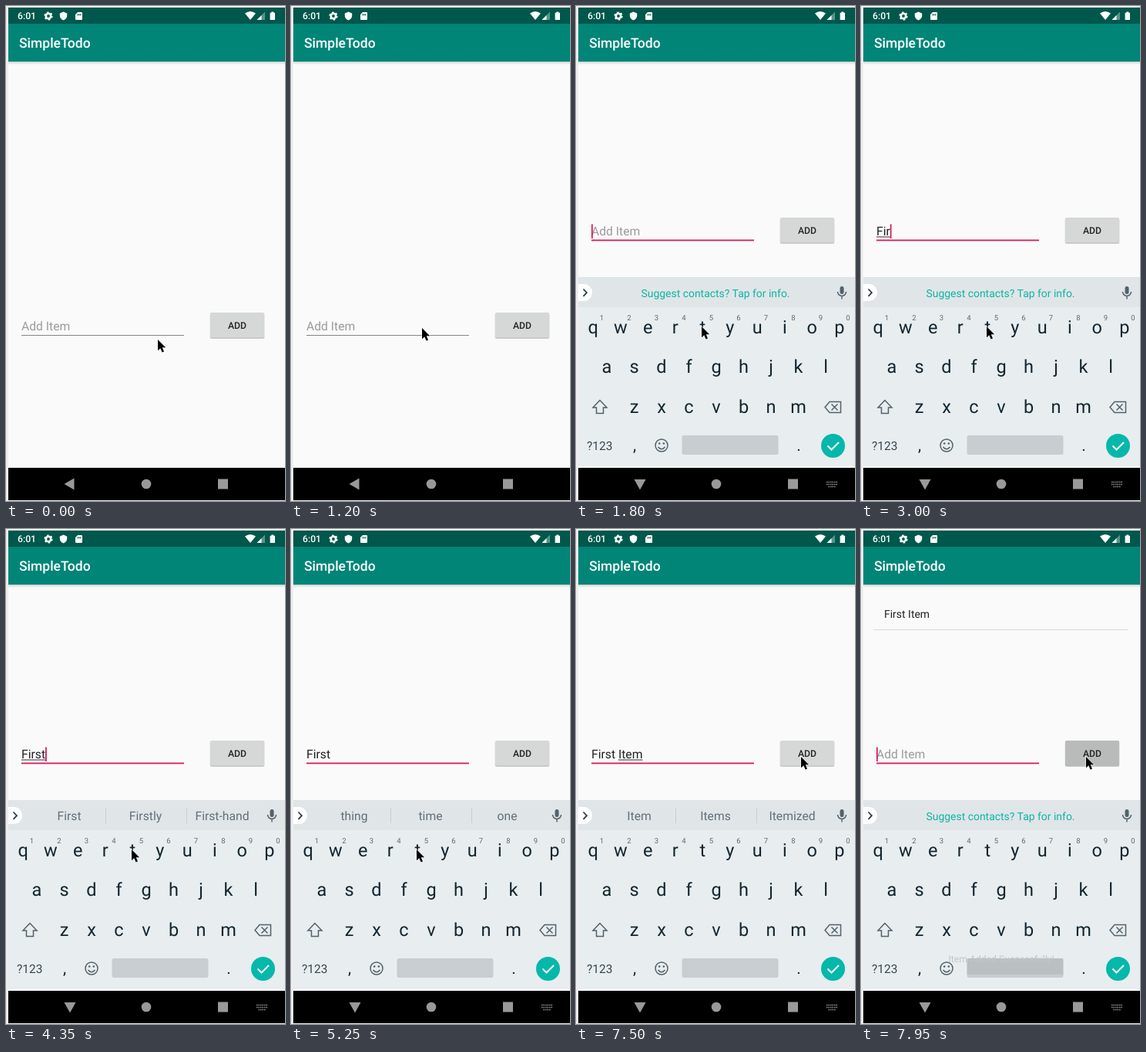
An HTML page that plays this animation: 362 by 641 pixels, repeating every 8000 ms.

```html
<!DOCTYPE html>
<html lang="en">
<head>
<meta charset="utf-8">
<title>To-do app</title>
<style>
  html, body { margin: 0; width: 100%; height: 100%; overflow: hidden; background: #eee; }
  svg { display: block; width: 100vw; height: 100vh; }
  text { font-family: Roboto, sans-serif; white-space: pre; text-rendering: geometricPrecision; }
  .medium { font-weight: 500; }
  .mid { text-anchor: middle; }
  .line { fill: none; stroke: #52626a; stroke-width: 1.5; }
</style>
</head>
<body>
<svg viewBox="0 0 362 641" xmlns="http://www.w3.org/2000/svg">
  <defs>
    <linearGradient id="shade" x2="0" y2="1">
      <stop stop-color="#cfd3d2"/><stop offset="1" stop-color="#fafafa"/>
    </linearGradient>
  </defs>
  <rect width="362" height="641" fill="#eee"/>
  <rect x="3" y="72" width="359" height="526" fill="#fafafa"/>
  <rect x="3" y="72" width="359" height="4" fill="url(#shade)"/>
  <rect x="3" y="2" width="359" height="21" fill="#00574b"/>
  <rect x="3" y="23" width="359" height="49" fill="#008577"/>
  <text class="medium" x="17" y="54" font-size="17.5" fill="#fff">SimpleTodo</text>

  <g fill="#fff">
    <text class="medium" x="15" y="17.3" font-size="12.2">6:01</text>
    <circle cx="55" cy="13" r="3.2" fill="none" stroke="#fff" stroke-width="2.6"/>
    <circle cx="55" cy="13" r="4.8" fill="none" stroke="#fff" stroke-width="1.6" stroke-dasharray="2.5 2.527"/>
    <path d="M74.5 7.5l-4.7 2v3.1c0 2.8 2 5.2 4.7 6 2.700-.8 4.700-3.200 4.700-6v-3.100z"/>
    <path fill-rule="evenodd" d="M93 8h5q1 0 1 1v8q0 1-1 1h-7q-1 0-1-1v-6zM92.600 10v2.500h1v-2.500zm1.900 0v2.500h1v-2.500zm1.900 0v2.500h1v-2.500z"/>
    <path d="M310 9.500q7-5 14 0l-7 8.500z"/>
    <path d="M336 7.500v10.500h-10.500z" opacity=".35"/>
    <path d="M331.500 12v6h-6z"/>
    <path d="M344.300 7.500h3v1.200h1.700v9.300h-6.400v-9.300h1.700z"/>
  </g>

  <g id="row">
    <text x="30" y="115" font-size="13.97" fill="#222">First Item</text>
    <rect x="16" y="130" width="331" height="1" fill="#dadada"/>
  </g>

  <g id="form">
    <text id="entry" x="20" y="297" font-size="15.7"/>
    <rect id="compose" y="298.500" height="1" fill="#333"/>
    <rect id="caret" y="282.500" width="1.75" height="18.500" fill="#d81b60"/>
    <rect id="rule" x="20" width="211"/>
    <rect x="264.500" y="275" width="71" height="33" rx="2" fill="#000" opacity=".12"/>
    <rect x="265" y="275" width="70" height="32.500" rx="2" fill="#000" opacity=".15"/>
    <rect id="button" x="265" y="274" width="70" height="32.500" rx="1.500"/>
    <text class="medium mid" x="300" y="294.500" font-size="12.2" fill="#222">ADD</text>
  </g>

  <g id="keyboard">
    <rect x="3" y="351" width="359" height="247" fill="#e8edf0"/>
    <rect x="3" y="351" width="359" height="39" fill="#e0e5e8"/>
    <path d="M3 360h7a11 11 0 0 1 0 22h-7z" fill="#fff"/>
    <path d="M9.500 366.500l4.500 4.700-4.500 4.700" fill="none" stroke="#263840" stroke-width="1.700"/>
    <text id="tip" class="mid" x="181" y="377" font-size="13.95" fill="#0cb5a4">Suggest contacts? Tap for info.</text>
    <g id="words" font-size="15.7" fill="#607079">
      <text class="mid" x="82" y="377"/>
      <text class="mid" x="181" y="377"/>
      <text class="mid" x="280.500" y="377"/>
      <path d="M129.500 361v20M234.500 361v20" stroke="#c8ced2"/>
    </g>
    <rect x="342.500" y="363" width="5" height="10" rx="2.500" fill="#52626a"/>
    <path class="line" d="M339.500 370a5.500 5.500 0 0 0 11 0M345 375.500v4"/>
    <g id="keys" fill="#11262f"></g>
    <path class="line" d="M31 510.500l-9 9.500h4.500v7.500h9v-7.500h4.500z"/>
    <path class="line" d="M329 512.500h14.500v14h-14.500l-6-7zM331.500 515.500l8 8m0-8l-8 8"/>
    <text x="14" y="574.500" font-size="15.500" fill="#37474f">?123</text>
    <circle class="line" cx="111" cy="569" r="8"/>
    <path class="line" d="M106.500 571q4.500 5.500 9 0"/>
    <circle cx="108.200" cy="566.500" r="1.300" fill="#52626a"/>
    <circle cx="113.800" cy="566.500" r="1.300" fill="#52626a"/>
    <rect x="137.500" y="556" width="125" height="25" rx="2.500" fill="#c8cdd1"/>
    <circle cx="333.500" cy="569.500" r="15.500" fill="#05b8aa"/>
    <path d="M326.500 569.500l5 5 9.500-9.500" fill="none" stroke="#fff" stroke-width="2"/>
  </g>

  <g id="toast">
    <rect x="137.500" y="556" width="125" height="21" fill="#000" opacity=".07"/>
    <text class="mid" x="182" y="561" font-size="12.2" fill="#c2c6c8">Item Added Successfully!</text>
  </g>

  <rect x="3" y="596" width="359" height="2" fill="#fcfcfc"/>
  <rect x="3" y="598" width="359" height="42" fill="#000"/>
  <g fill="#999">
    <path id="back"/>
    <circle cx="182" cy="619" r="6.300"/>
    <rect x="275" y="612.500" width="13" height="13"/>
    <path id="switcher" d="M325 616.500h14M325 619.500h14M327.500 622.500h9" stroke="#999" stroke-width="1.500" stroke-dasharray="1.500 1"/>
  </g>
  <path id="pointer" d="M0 0V14.200L3.300 11.200 5.600 16.400 8 15.400 5.800 10.300H10.200Z" stroke="#fff" stroke-width="1.200" paint-order="stroke"/>
</svg>
<script>
const LOOP = 8000;
const $ = id => document.getElementById(id);
const set = (id, attrs) => { for (const k in attrs) $(id).setAttribute(k, attrs[k]); };
const show = (id, on) => $(id).setAttribute('visibility', on ? 'visible' : 'hidden');
const write = (node, text) => { if (node.textContent !== text) node.textContent = text; };

const pen = document.createElement('canvas').getContext('2d');
const widthOf = text => {
  pen.font = '157px Roboto, sans-serif';
  return pen.measureText(text).width / 10;
};

function addKey(label, x, y, size, fill) {
  const key = document.createElementNS('http://www.w3.org/2000/svg', 'text');
  const attrs = { x, y, class: 'mid', 'font-size': size };
  if (fill) attrs.fill = fill;
  for (const k in attrs) key.setAttribute(k, attrs[k]);
  key.textContent = label;
  $('keys').append(key);
}
[['qwertyuiop', 22.3, 424], ['asdfghjkl', 40, 475], ['zxcvbnm', 75.500, 526.500]].forEach(([row, x, y]) =>
  [...row].forEach((c, i) => addKey(c, x + i * 35.5, y, 23.5)));
[...'1234567890'].forEach((c, i) => addKey(c, 33.3 + i * 35.5, 406.5, 9.5, '#5c6a72'));
addKey(',', 76, 576, 21);
addKey('.', 289, 576, 21);

// Each track lists [start time, ...values]; values hold until the next entry.
const pointer = [
  [0, 197, 432], [150, 188, 426], [300, 179, 419], [1200, 170, 417], [1350, 163, 415],
  [7200, 190, 390], [7350, 245, 338], [7500, 292, 295]
];
const typed = [
  [0, ''], [2700, 'F'], [2850, 'Fi'], [3000, 'Fir'], [3300, 'Firs'], [4350, 'First'],
  [4800, 'First '], [5700, 'First I'], [6300, 'First It'], [6450, 'First Ite'],
  [6600, 'First Item'], [7800, '']
];
const caret = [
  [0, false], [1500, true], [2100, false], [2550, true], [3750, false], [4200, true],
  [5250, false], [5700, true], [6150, false], [6300, true], [7200, false], [7650, true]
];
const words = [
  [0], [3300, 'Firs', 'First', 'Firsts'], [4350, 'First', 'Firstly', 'First-hand'],
  [4800, 'thing', 'time', 'one'], [5700, 'I', 'I’m', 'It'],
  [6300, 'It', 'It’s', 'Its'], [6600, 'Item', 'Items', 'Itemized'], [7800]
];
const at = (track, t) => track.findLast(step => step[0] <= t).slice(1);

function render(t) {
  const [x, y] = at(pointer, t);
  set('pointer', { transform: `translate(${x} ${y})` });

  const focused = t >= 1500, raised = t >= 1650, added = t >= 7800;
  set('form', { transform: `translate(0 ${raised ? 0 : 123})` });
  set('rule', focused ? { y: 302.5, height: 1.8, fill: '#d81b60' } : { y: 303, height: 1, fill: '#858585' });
  set('button', { fill: t >= 7650 ? '#b9baba' : '#d6d7d7' });

  const [text] = at(typed, t);
  write($('entry'), text || 'Add Item');
  set('entry', { fill: text ? '#212121' : '#9b9b9b' });
  const end = 20 + widthOf(text);
  const wordStart = 20 + widthOf(text.slice(0, text.lastIndexOf(' ') + 1));
  set('compose', { x: wordStart, width: Math.max(0, end - wordStart) });
  set('caret', { x: end });
  show('caret', at(caret, t)[0]);

  const hints = at(words, t), open = t >= 1800;
  show('keyboard', open);
  show('tip', open && !hints.length);
  show('words', open && hints.length);
  $('words').querySelectorAll('text').forEach((node, i) => write(node, hints[i] || ''));

  set('back', { d: raised ? 'M75.5 613h15l-7.5 13.500z' : 'M75.5 619l13-7.500v15z' });
  show('switcher', raised);
  show('row', added);
  show('toast', t >= 7950);
}

const start = performance.now();
function tick() {
  render((performance.now() - start) % LOOP);
  requestAnimationFrame(tick);
}
tick();
</script>
</body>
</html>
```
